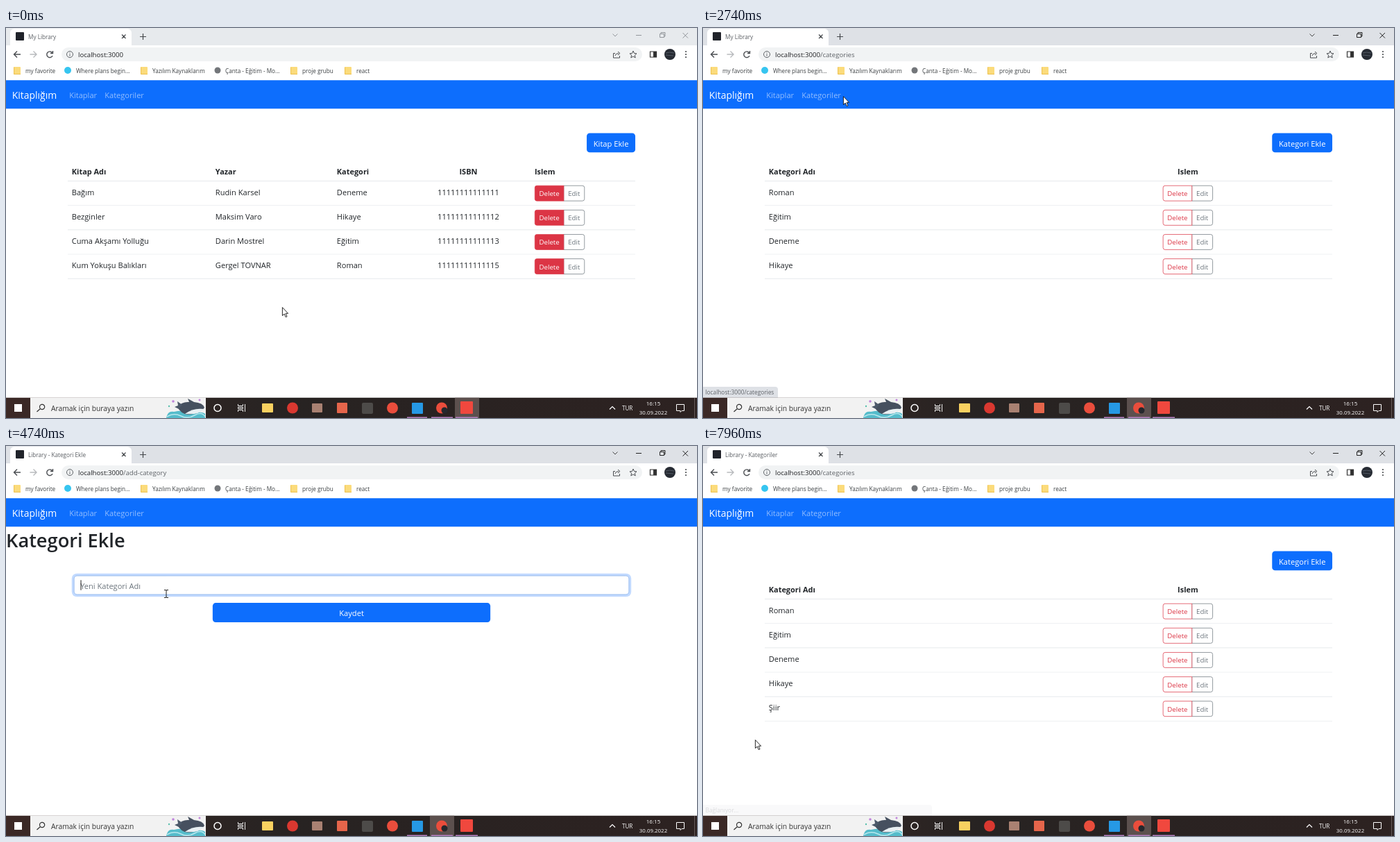
An HTML page with a canvas for the animation above (8000 ms loop, 996 by 562 pixels).

```html
<!DOCTYPE html>
<html lang="tr">
<head>
<meta charset="utf-8">
<title>Kitaplığım</title>
<style>
  html, body { margin: 0; width: 100%; height: 100%; overflow: hidden; background: #fff; }
  canvas { display: block; }
</style>
</head>
<body>
<canvas id="stage" width="996" height="562"></canvas>
<script>
const ctx = document.getElementById('stage').getContext('2d');
const LOOP = 8000;
// The web page is laid out on a 1366 x 768 screen and scaled to the stage
const SCALE_X = 996 / 1366, SCALE_Y = 562 / 768;
const BLUE = '#0d6efd', HOVER = '#0b5ed7', PRESSED = '#0a58ca';
const RED = '#dc3545', GRAY = '#6c757d', INK = '#212529', RULE = '#dee2e6';

// Page areas: x, y, width, height
const ADD_BOOK = [1148, 207, 96, 38], ADD_CATEGORY = [1125, 207, 119, 38];
const INPUT = [134, 255, 1098, 38], SAVE = [408.5, 309, 549, 38];
const BOOKS_LINK = [125, 111, 55, 40], CATEGORIES_LINK = [195, 111, 78, 40];

const BOOKS = [
  ['Bağım', 'Rudin Karsel', 'Deneme', '11111111111111'],
  ['Bezginler', 'Maksim Varo', 'Hikaye', '11111111111112'],
  ['Cuma Akşamı Yolluğu', 'Darin Mostrel', 'Eğitim', '11111111111113'],
  ['Kum Yokuşu Balıkları', 'Gergel TOVNAR', 'Roman', '11111111111115'],
];
const CATEGORIES = ['Roman', 'Eğitim', 'Deneme', 'Hikaye', 'Şiir'];

// Pointer stops on the stage: time, x, y
const POINTER = [
  [0, 398, 402], [880, 398, 402], [1150, 526, 330], [1400, 430, 250], [1660, 342, 268],
  [2000, 342, 268], [2370, 169, 92], [2690, 169, 92], [2800, 280, 112], [3220, 863, 196],
  [3370, 863, 196], [3660, 872, 170], [3830, 872, 170], [3960, 702, 181], [4370, 231, 213],
  [6350, 231, 213], [6370, 228, 217], [6400, 234, 230], [6590, 234, 230], [6850, 335, 248],
  [7090, 455, 239], [7720, 455, 239], [7960, 75, 423], [LOOP, 75, 423],
];

// Latest value whose start time has passed
const at = (t, steps) => steps.reduce((value, [start, next]) => (t >= start ? next : value), null);
const ramp = (t, from, to) => Math.min(1, Math.max(0, (t - from) / (to - from)));
const inside = (p, [x, y, w, h]) => p.x >= x && p.x <= x + w && p.y >= y && p.y <= y + h;

function text(string, x, y, size, color = INK, weight = 400, align = 'left') {
  ctx.font = `${weight} ${size}px "Open Sans", "Noto Sans", sans-serif`;
  ctx.textAlign = align;
  ctx.fillStyle = color;
  ctx.fillText(string, x, y);
}
function box(x, y, w, h, fill, radius = 0, border) {
  ctx.beginPath();
  ctx.roundRect(x, y, w, h, radius);
  if (fill) { ctx.fillStyle = fill; ctx.fill(); }
  if (border) { ctx.strokeStyle = border; ctx.lineWidth = 1; ctx.stroke(); }
}
function dot(x, y, r, fill) {
  box(x - r, y - r, 2 * r, 2 * r, fill, r);
}
function stroke(path, color, width = 1) {
  ctx.strokeStyle = color;
  ctx.lineWidth = width;
  ctx.stroke(new Path2D(path));
}
function shape(path, fill) {
  ctx.fillStyle = fill;
  ctx.fill(new Path2D(path));
}

function pointerAt(t) {
  const i = Math.max(0, POINTER.findIndex(stop => stop[0] > t) - 1);
  const [a, b] = [POINTER[i], POINTER[i + 1]];
  const span = b[0] - a[0], u = (t - a[0]) / span;
  const velocity = (k, axis) => {
    const prev = POINTER[k - 1], here = POINTER[k], next = POINTER[k + 1];
    const resting = !prev || !next || [prev, next].some(s => s[1] === here[1] && s[2] === here[2]);
    return resting ? 0 : (next[axis] - prev[axis]) / (next[0] - prev[0]);
  };
  const hermite = axis => {
    const ease = u * u * (3 - 2 * u);
    return a[axis] + (b[axis] - a[axis]) * ease
      + span * u * (1 - u) * ((1 - u) * velocity(i, axis) - u * velocity(i + 1, axis));
  };
  return { x: hermite(1), y: hermite(2) };
}

function drawPointer(kind, p) {
  ctx.save();
  ctx.translate(Math.round(p.x), Math.round(p.y));
  ctx.lineJoin = 'round';
  if (kind === 'text') {
    stroke('M-3 -5.5H-1L0 -5L1 -5.5H3M0 -5V5M-3 5.5H-1L0 5L1 5.5H3', '#222');
  } else {
    const path = kind === 'hand'
      ? 'M-1.5 9V1Q-1.5 -.5 0 -.5Q1.5 -.5 1.5 1V5Q3.5 4.5 4 6Q6 5.5 6.5 7Q8 7 8 8.5V11Q8 13 6.5 15.5H0Q-1 13 -4 10Q-5 8 -3.5 7.5Z'
      : 'M.4 .6V12.5L3.2 10L5.2 14.6L7 13.8L5.1 9.3H8.6Z';
    shape(path, '#fff');
    stroke(path, '#111', .9);
    if (kind === 'hand') stroke('M1.5 5V8M4 6V8.5M6.3 7V9', '#111', .8);
  }
  ctx.restore();
}

function folder(x) {
  box(x - 5, 56, 10, 11, '#fbdb7b', 1);
  stroke(`M${x - 4.5} 56.5V66.5H${x + 5}`, '#edc14f');
}

function browser(t, focused, url) {
  const control = focused ? '#222' : '#92969b', icon = '#4a4d51';
  box(0, 0, 996, 25, focused ? '#dee1e6' : '#e7eaed');
  box(6, 1, 175, 25, '#fff', [6, 6, 0, 0]);
  box(14, 6, 12, 12, '#20232a', 1);
  text(at(t, [[0, 'My Library'], [2850, 'Library - Kategoriler'],
    [4150, 'Library - Kategori Ekle'], [7780, 'Library - Kategoriler']]), 32, 15.5, 8.2, '#5a5e63');
  stroke('M167 9.5L172.5 15M172.5 9.5L167 15M193 12.5H202M197.5 8V17', '#45484c', 1.2);
  stroke('M874.5 8.5L878 12L881.5 8.5', focused ? '#444' : control);
  stroke('M908 10.5H916M942.5 8.5H948.5V13.5H942.5ZM944 8V6.5H950V12H949M975.5 7L983 14.5M983 7L975.5 14.5', control);

  box(0, 25, 996, 51, '#fff');
  stroke('M21 38H12M16 33.5L11.5 38L16 42.5', icon, 1.4);
  stroke('M34.5 38H44M39.5 33.5L44 38L39.5 42.5', '#b8babd', 1.4);
  stroke('M66.5 35.5A4.3 4.3 0 1 0 67 40M67.5 33V36.5H64', icon, 1.4);
  box(80, 28, 837, 20, '#f1f3f4', 10);
  stroke('M87.5 38A4.5 4.5 0 1 0 96.5 38A4.5 4.5 0 1 0 87.5 38M92 37.5V40.5M92 35.3V36.4', '#5f6368');
  text('localhost:3000', 104, 41.5, 9.65, '#202124');
  text(url, 104 + ctx.measureText('localhost:3000').width, 41.5, 9.65, '#5f6368');
  stroke('M878 36.5H875.5V43H884.5V40M878 40Q878.5 36.5 883 36.5M882 34L885 36.5L882 39', icon);
  stroke('M904 33L905.5 36.5L909 36.8L906.3 39.2L907.2 42.8L904 40.9L900.8 42.8L901.7 39.2L899 36.8L902.5 36.5Z', icon);
  stroke('M928.5 34H937.5V42H928.5Z', '#333', 1.2);
  box(933, 34, 5, 8, '#333');
  dot(957, 38, 8, '#262b33');
  stroke('M951 36Q956 34 963 36M951 39L962 40', '#545b66');
  for (const y of [34, 38, 42]) dot(980, y, 1.1, icon);

  [16, 199, 415, 493].forEach(folder);
  dot(89, 61, 5, '#36c5f0');
  dot(305, 61, 4.5, '#73767a');
  [['my favorite', 28], ['Where plans begin...', 101], ['Yazılım Kaynaklarım', 211],
    ['Çanta - Eğitim - Mo...', 316], ['proje grubu', 427], ['react', 505]]
    .forEach(([label, x]) => text(label, x, 64.5, 8.2, '#3c4043'));
}

function taskbar(focused) {
  const tint = ctx.createLinearGradient(0, 0, 996, 0);
  tint.addColorStop(0, '#3c2926');
  tint.addColorStop(.4, '#272322');
  tint.addColorStop(1, '#2d2221');
  box(0, 532.75, 996, 30, tint);
  box(12, 542, 11, 11, '#fff');
  box(35, 532.75, 253, 30, '#f2f2f2');
  stroke('M48.5 546A3.6 3.6 0 1 0 55.7 546A3.6 3.6 0 1 0 48.5 546M49.5 548.5L44.5 553', '#333', 1.2);
  text('Aramak için buraya yazın', 65, 551.5, 10.3, '#333');

  // Whale in the search box
  shape('M231 562Q233 551 242 553Q256 549 268 555Q282 552 287 556V562Z', '#55bccb');
  shape('M247 546Q254 538 264 539L262 534L271 539Q284 540 286 547Q280 556 262 557Q252 556 247 546Z', '#46505f');
  shape('M258 556Q270 547 285 549Q278 558 258 556Z', '#e8eff2');
  shape('M249 549L243 546L248 544L247 538L254 543Z', '#4c5869');
  stroke('M232 560Q242 554 252 559T272 558T287 560', '#b8e7ed', 1.5);
  dot(241, 538, 1.8, '#c084dc');
  dot(279, 536, 1.5, '#c084dc');
  dot(235, 545, 1.2, '#58bfae');

  box(focused ? 611 : 647, 532.75, 35, 30, '#5c504e');
  stroke('M300 547.5A5 5 0 1 0 310 547.5A5 5 0 1 0 300 547.5', '#fff', 1.5);
  stroke('M334.5 542V544.5H341.5V542M334.5 553V550.5H341.5V553M334.5 546.5H341.5V548.5H334.5ZM344.5 542V553', '#eee');
  box(369, 541, 16, 13, '#f8d160', 1);
  dot(413, 547.5, 8, '#d93830');
  box(441, 541, 15, 13, '#a98172', 1);
  box(477, 540, 15, 15, '#e5654b', 1);
  box(513, 540, 16, 16, '#4d4b49', 2);
  dot(557, 547.5, 8, '#ea4d3c');
  box(585, 540, 16, 16, '#2699e5', 1);
  dot(628, 547.5, 8, '#ea4d3c');
  dot(632, 551, 4.5, '#25282d');
  box(655, 538, 18, 18, '#f0483e', 1);
  for (const [x, w] of [[578, 29], [613, 31], [648, 32]]) box(x, 560.5, w, 1.5, '#b47fc0');

  stroke('M870 549.5L874 545.5L878 549.5', '#fff', 1.2);
  text('TUR', 888, 550.5, 8.1, '#fff');
  text('16:15', 933, 543.5, 8, '#fff', 400, 'center');
  text('30.09.2022', 933, 556.5, 7.9, '#fff', 400, 'center');
  stroke('M966.5 542.5H977.5V551.5H974L972 553.5V551.5H966.5Z', '#fff');
  box(992, 533, 1, 29, '#655b59');
}

function navbar(p) {
  const link = (label, area) =>
    text(label, area[0], 138, 15.2, `rgba(255,255,255,${inside(p, area) ? .65 : .55})`);
  box(0, 103, 1366, 56, BLUE);
  text('Kitaplığım', 12, 139, 19.1, '#fff');
  link('Kitaplar', BOOKS_LINK);
  link('Kategoriler', CATEGORIES_LINK);
}

function button(label, [x, y, w, h], fill) {
  box(x, y, w, h, fill, 6);
  text(label, x + w / 2, y + 26, 15.3, '#fff', 400, 'center');
}

function rowButtons(x, y, solid) {
  box(x + 57.5, y + .5, 41, 30, '#fff', [0, 4, 4, 0], GRAY);
  box(x + .5, y + .5, 57, 30, solid ? RED : '#fff', [4, 0, 0, 4], RED);
  text('Delete', x + 29, y + 21, 13.3, solid ? '#fff' : RED, 400, 'center');
  text('Edit', x + 78, y + 21, 13.3, GRAY, 400, 'center');
}

// Columns: heading, x, alignment
function table(columns, rows, buttonsX, solid) {
  for (const [label, x, align] of columns) text(label, x, 288, 15, INK, 700, align);
  box(122, 301, 1122, 1, RULE);
  rows.forEach((cells, i) => {
    const top = 302 + 48 * i;
    cells.forEach((cell, k) => text(cell, columns[k][1], top + 27, 15.2, INK, 400, columns[k][2]));
    rowButtons(buttonsX, top + 8, solid);
    box(122, top + 47, 1122, 1, RULE);
  });
}

function booksPage(p) {
  button('Kitap Ekle', ADD_BOOK, inside(p, ADD_BOOK) ? HOVER : BLUE);
  table([['Kitap Adı', 130], ['Yazar', 414], ['Kategori', 654], ['ISBN', 914, 'center'], ['Islem', 1045]],
    BOOKS, 1045, true);
}

function categoriesPage(p, count) {
  button('Kategori Ekle', ADD_CATEGORY, inside(p, ADD_CATEGORY) ? HOVER : BLUE);
  table([['Kategori Adı', 130], ['Islem', 958.5, 'center']],
    CATEGORIES.slice(0, count).map(name => [name]), 909, false);
}

function formPage(t, p) {
  text('Kategori Ekle', 0, 200, 37.3, INK, 600);
  const focus = ramp(t, 4510, 4660) - ramp(t, 6940, 7090);
  const [x, y, w, h] = INPUT;
  box(x - 4, y - 4, w + 8, h + 8, `rgba(13,110,253,${.25 * focus})`, 10);
  box(x + .5, y + .5, w - 1, h - 1, '#fff', 6, '#ced4da');
  box(x + .5, y + .5, w - 1, h - 1, null, 6, `rgba(134,183,254,${focus})`);
  const typed = at(t, [[0, ''], [5510, 'Ş'], [5770, 'Şi'], [5920, 'Şii'], [6000, 'Şiir']]);
  text(typed || 'Yeni Kategori Adı', x + 13, y + 26, 15.2, typed ? INK : GRAY);
  const caret = (t >= 4600 && t < 5180) || (t >= 5510 && t < 6590);
  if (caret) box(x + 13.5 + ctx.measureText(typed).width, y + 9, 1.3, 20, '#111');
  const pressed = t >= 6990 && t < 7200;
  button('Kaydet', SAVE, pressed ? PRESSED : inside(p, SAVE) ? HOVER : BLUE);
}

function statusBubble(label, width, alpha = 1) {
  ctx.globalAlpha = alpha;
  box(0, 517, width, 16, '#dee1e6', [0, 4, 0, 0]);
  text(label, 3.5, 528, 8.3, '#5f6368');
  ctx.globalAlpha = 1;
}

function pointerKind(page, p) {
  const [x, y, w, h] = INPUT;
  if (page === 'form' && inside(p, [x, y, w, h + 6])) return 'text';
  const action = { books: ADD_BOOK, categories: ADD_CATEGORY, form: SAVE }[page];
  return [BOOKS_LINK, CATEGORIES_LINK, action].some(area => inside(p, area)) ? 'hand' : 'arrow';
}

function draw() {
  const t = performance.now() % LOOP;
  const pointer = pointerAt(t);
  const p = { x: pointer.x / SCALE_X, y: pointer.y / SCALE_Y };
  const page = at(t, [[0, 'books'], [2560, 'categories'], [3850, 'form'], [7510, 'categories']]);
  const focused = t >= 2540;
  box(0, 0, 996, 562, '#fff');
  browser(t, focused, { books: '', categories: '/categories', form: '/add-category' }[page]);

  ctx.save();
  ctx.scale(SCALE_X, SCALE_Y);
  navbar(p);
  if (page === 'books') booksPage(p);
  else if (page === 'form') formPage(t, p);
  else categoriesPage(p, t < 7510 ? 4 : 5);
  ctx.restore();

  if (t >= 2480 && t < 3500) statusBubble('localhost:3000/categories', 108);
  else if (t >= 3500 && t < 4200) statusBubble('localhost:3000/add-category', 120);
  else if (t >= 7590) statusBubble('Bağlanıyor...', 330, .2);

  taskbar(focused);
  drawPointer(pointerKind(page, p), pointer);
  requestAnimationFrame(draw);
}
draw();
</script>
</body>
</html>
```
